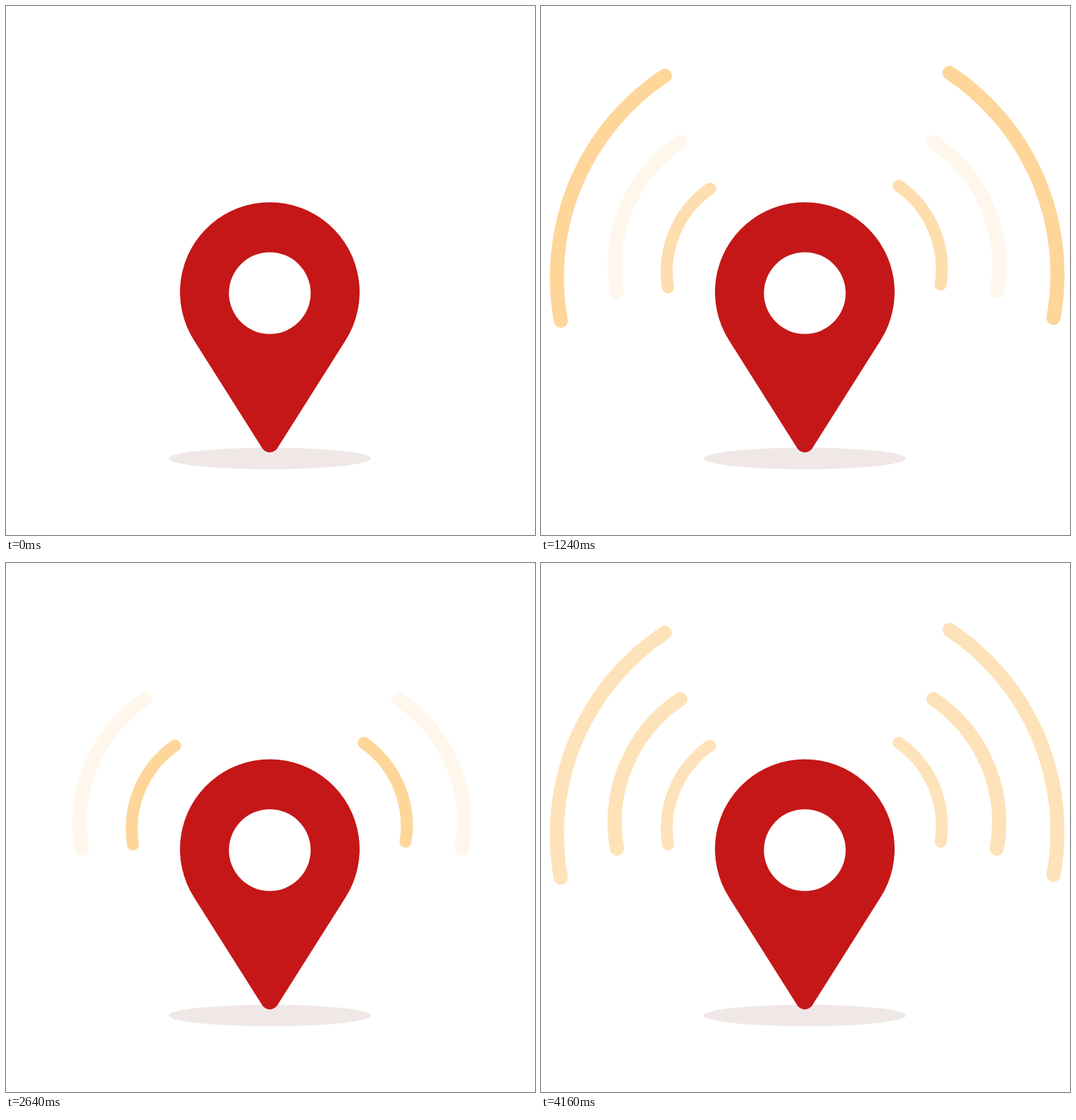
These frames come from a looping animation (748x748 px, 4.2 s). An HTML page:

```html
<!DOCTYPE html>
<html lang="en">
<head>
<meta charset="utf-8">
<title>Location signal</title>
<style>
  html, body { margin: 0; width: 100%; height: 100%; overflow: hidden; background: #fff; }
  svg { display: block; width: 100%; height: 100%; }
  .wave { fill: none; stroke: #fed69a; stroke-linecap: round; opacity: 0; }
</style>
</head>
<body>
<svg viewBox="0 0 748 748">
  <ellipse cx="373" cy="639.8" rx="143" ry="15.2" fill="#f0e7e7"/>
  <path fill="#c51718" d="M266 473A127 127 0 1 1 480 473L384.5 624C379.5 633.5 366.5 633.5 361.5 624Z"/>
  <circle cx="373" cy="406" r="57.8" fill="#fff"/>
  <g class="wave" stroke-width="17">
    <path d="M179.5 398A143 143 0 0 1 239 258.3"/>
    <path d="M565 394A143 143 0 0 0 505.8 254.3"/>
  </g>
  <g class="wave" stroke-width="20">
    <path d="M107.5 404A210.3 210.3 0 0 1 197 192.5"/>
    <path d="M644.5 404A210.3 210.3 0 0 0 555 192.5"/>
  </g>
  <g class="wave" stroke-width="20">
    <path d="M28 445A342.5 342.5 0 0 1 175 98.5"/>
    <path d="M724.7 441A342.5 342.5 0 0 0 577.7 94.5"/>
  </g>
</svg>
<script>
  const LOOP = 4200, CYCLE = 2200, TICK = 40;
  const waves = document.querySelectorAll('.wave');

  // Per wave: fade in from/to, then dip start/bottom/end
  const steps = [
    [140, 350, 880, 1080, 1280],
    [400, 600, 1075, 1280, 1490],
    [650, 870, 1270, 1490, 1710]
  ];
  const FADE_OUT = [1890, 2120];

  const ramp = (t, a, b) => Math.min(1, Math.max(0, (t - a) / (b - a)));

  function level(t, [start, full, dip, low, back]) {
    return ramp(t, start, full)
      - ramp(t, dip, low)
      + ramp(t, low, back)
      - ramp(t, ...FADE_OUT);
  }

  function draw(now) {
    const time = Math.floor((now % LOOP) / TICK) * TICK;
    waves.forEach((wave, i) => {
      wave.style.opacity = level(time % CYCLE, steps[i]).toFixed(3);
    });
  }

  const begin = performance.now();
  function loop() {
    draw(performance.now() - begin);
    requestAnimationFrame(loop);
  }
  loop();
</script>
</body>
</html>
```
